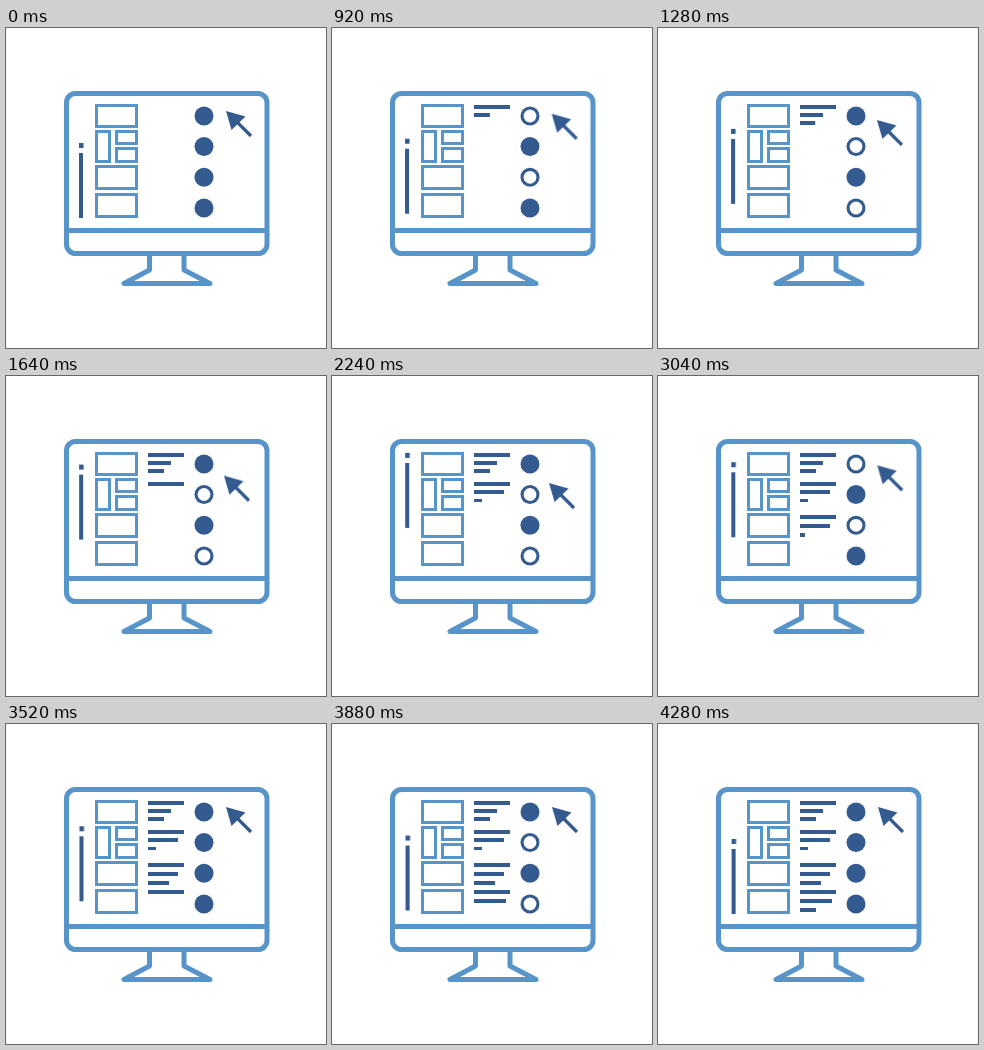
Recreate the animation shown at these times as an HTML page without scripts. Size 320x320 px, loop 4840 ms.

```html
<!DOCTYPE html>
<html lang="en">
<head>
<meta charset="utf-8">
<title>Monitor</title>
<style>
@property --t { syntax: "<number>"; inherits: true; initial-value: 0; }

html, body { margin: 0; width: 100%; height: 100%; overflow: hidden; background: #fff; }
svg { display: block; width: 100vw; height: 100vh; --loop: 4.84s; }

.frame { fill: none; stroke: #5694ca; stroke-width: 5; stroke-linejoin: round; }
.panels { fill: none; stroke: #5694ca; stroke-width: 3; }
.ink { fill: #335b90; }

/* --t counts milliseconds; line k starts typing 312 ms after line k-1 */
.lines { animation: clock var(--loop) linear infinite; }
.lines rect {
  --u: clamp(0, (var(--t) - 480 - 312 * var(--k)) / 205, 1);
  transform-box: fill-box;
  transform-origin: 0 0;
  transform: scaleX(calc(var(--u) * var(--u) * (3 - 2 * var(--u))));
}
@keyframes clock { from { --t: 0; } to { --t: 4840; } }

.scroll { animation: scroll var(--loop) infinite; }
@keyframes scroll {
  0%, 9.92% { transform: translate(0, 0); animation-timing-function: ease-in-out; }
  49.17% { transform: translate(.2px, -38.5px); animation-timing-function: ease-in-out; }
  88.43%, 100% { transform: translate(.6px, 0); }
}

.arrow { animation: point var(--loop) infinite; }
@keyframes point {
  0%, 9.92% { transform: translate(0, 0); animation-timing-function: ease-in-out; }
  49.17% { transform: translate(-3px, 24.3px); animation-timing-function: ease-in-out; }
  70.25%, 100% { transform: translate(0, 0); }
}

/* holes blink nine times per loop, hidden while the picture rests */
.holes { fill: #fff; animation: gate var(--loop) step-end infinite; }
.holes g { animation: calc(var(--loop) / 9) step-end infinite; }
.odd { animation-name: odd !important; }
.even { animation-name: even !important; }
@keyframes gate { 0% { opacity: 0; } 10.4% { opacity: 1; } 88.3%, 100% { opacity: 0; } }
@keyframes even { 0% { opacity: 0; } 3% { opacity: 1; } 40%, 100% { opacity: 0; } }
@keyframes odd { 0% { opacity: 0; } 57% { opacity: 1; } 94%, 100% { opacity: 0; } }
</style>
</head>
<body>
<svg viewBox="0 0 320 320">
  <g class="frame">
    <rect x="60.5" y="65.5" width="200.5" height="160" rx="9"/>
    <path d="M60 202.5H261"/>
    <path d="M143.5 226V242L118 255.5H204L178 242V226"/>
  </g>

  <g class="panels">
    <rect x="90.5" y="77.5" width="40" height="21"/>
    <rect x="90.5" y="103.5" width="13" height="30"/>
    <rect x="110.5" y="103.5" width="20" height="12"/>
    <rect x="110.5" y="120.5" width="20" height="13"/>
    <rect x="90.5" y="138.5" width="40" height="22"/>
    <rect x="90.5" y="166.5" width="40" height="22"/>
  </g>

  <g class="ink scroll">
    <rect x="73" y="115" width="4.5" height="5"/>
    <rect x="73" y="125" width="4" height="65"/>
  </g>

  <g class="ink lines">
    <rect style="--k:0" x="142" y="77" width="36" height="4"/>
    <rect style="--k:1" x="142" y="85" width="23" height="4"/>
    <rect style="--k:2" x="142" y="93" width="16" height="4"/>
    <rect style="--k:3" x="142" y="106" width="36" height="4"/>
    <rect style="--k:4" x="142" y="114" width="30" height="4"/>
    <rect style="--k:5" x="142" y="123" width="8" height="3"/>
    <rect style="--k:6" x="142" y="139" width="36" height="4"/>
    <rect style="--k:7" x="142" y="148" width="30" height="4"/>
    <rect style="--k:8" x="142" y="157" width="21" height="4"/>
    <rect style="--k:9" x="142" y="166" width="36" height="4"/>
    <rect style="--k:10" x="142" y="175" width="32" height="4"/>
    <rect style="--k:11" x="142" y="184" width="16" height="4"/>
  </g>

  <g class="ink">
    <circle cx="198" cy="88" r="9.5"/>
    <circle cx="198" cy="118.5" r="9.5"/>
    <circle cx="198" cy="149.3" r="9.5"/>
    <circle cx="198" cy="180" r="9.5"/>
  </g>
  <g class="holes">
    <g class="odd">
      <circle cx="198" cy="88" r="6.4"/>
      <circle cx="198" cy="149.3" r="6.4"/>
    </g>
    <g class="even">
      <circle cx="198" cy="118.5" r="6.4"/>
      <circle cx="198" cy="180" r="6.4"/>
    </g>
  </g>

  <g class="ink arrow">
    <path d="M220 83L239.5 88.5L225.5 102Z"/>
    <path d="M230 93L245 108" stroke="#335b90" stroke-width="3.2"/>
  </g>
</svg>
</body>
</html>
```
